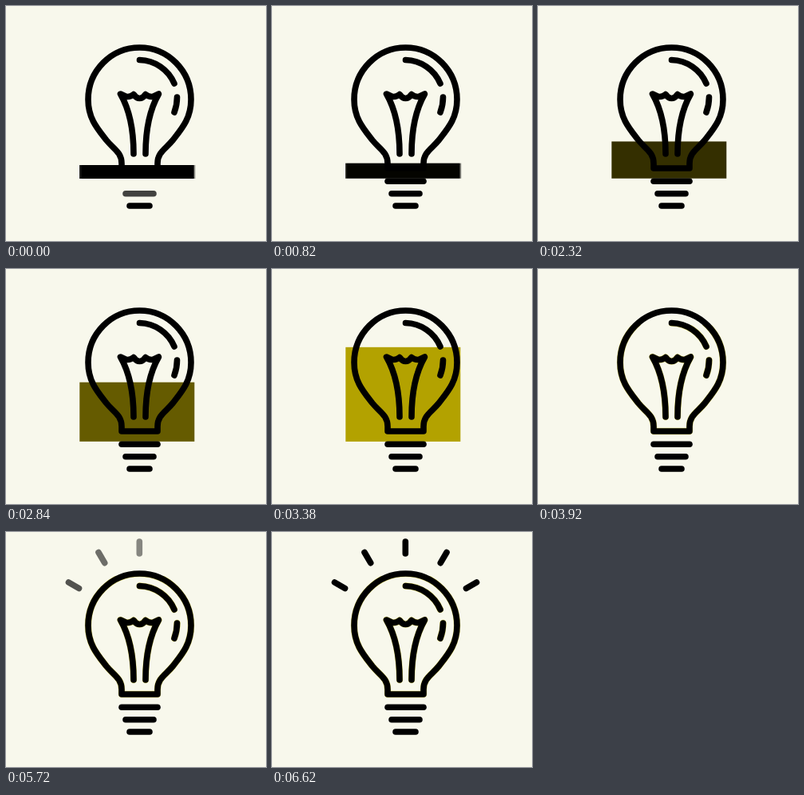
Write an HTML page without scripts that moves like this. It is 326 px wide and 294 px high and loops after 7.1 s.

```html
<!DOCTYPE html>
<html lang="en">
<head>
<meta charset="utf-8">
<title>Light bulb</title>
<style>
  html, body { margin: 0; width: 100%; height: 100%; overflow: hidden; background: #f8f8ec; }
  svg { display: block; width: 100vw; height: 100vh; }

  .ink { fill: none; stroke: #000; stroke-width: 7.6; stroke-linecap: round; stroke-linejoin: round; }
  .glow { fill: none; stroke: #d8cc20; stroke-width: 8.4; stroke-linecap: round; stroke-linejoin: round; opacity: .6; }

  .anim { animation: 7100ms linear infinite; }
  .level { transform-origin: 0 216px; animation-name: rise; }
  .tint { animation-name: tint; }
  .flood { animation-name: flood; }
  .after { animation-name: after; }
  .mid { animation-name: mid; }
  .top { animation-name: top; }
  .rays { animation-name: rays; }
  .ray { animation-name: ray; animation-delay: calc(var(--i) * 125ms); }

  /* liquid level and its colour share one easing */
  @keyframes rise {
    0% { transform: scaleY(.1056); animation-timing-function: cubic-bezier(.78, 0, .44, 1); }
    73.24%, 100% { transform: scaleY(1); }
  }
  @keyframes tint {
    0% { fill: #000; animation-timing-function: cubic-bezier(.78, 0, .44, 1); }
    73.24%, 100% { fill: #ffe600; }
  }
  @keyframes flood {
    0%, 50.98% { opacity: 1; }
    50.99%, 100% { opacity: 0; }
  }
  @keyframes after {
    0%, 50.98% { opacity: 0; }
    50.99%, 100% { opacity: 1; }
  }
  @keyframes mid {
    0% { opacity: .73; }
    2.8%, 100% { opacity: 1; }
  }
  @keyframes top {
    0%, 1.12% { opacity: 0; }
    1.13% { opacity: .36; }
    7.6%, 100% { opacity: 1; }
  }
  @keyframes rays {
    0%, 74% { opacity: 0; }
    74.01%, 100% { opacity: 1; }
  }
  @keyframes ray {
    0%, 75.35% { opacity: 0; }
    75.36% { opacity: .36; }
    86.2%, 100% { opacity: 1; }
  }
</style>
</head>
<body>
<svg viewBox="0 0 326 294">
  <defs>
    <g id="bulb">
      <path d="M145 203H190V197C190 183 200 179 209 168C220 154 232 141 232 117A64.5 65 0 1 0 103 117C103 141 115 154 126 168C135 179 145 183 145 197Z"/>
      <path d="M160 185C160 163 158 135 143.5 110L151 113.5Q156 114 160 110.5Q163.500 115.500 167.500 115.500Q171.500 115.500 175 110.500Q179 114 184 113.500L191.500 110C177 135 175 163 175 185"/>
      <path d="M167.500 67.500A48.500 48.500 0 0 1 211 97M214.500 114Q214.500 124 211 133"/>
    </g>
    <clipPath id="below">
      <rect class="anim level" x="92" y="55" width="145" height="161"/>
    </clipPath>
  </defs>

  <g class="anim flood">
    <g class="anim tint">
      <rect class="anim level" x="92.3" y="55" width="144" height="161"/>
    </g>
  </g>
  <g class="anim after">
    <g clip-path="url(#below)"><use href="#bulb" class="glow"/></g>
  </g>

  <g class="ink">
    <use href="#bulb"/>
    <path class="anim top" d="M145 219.300H190"/>
    <path class="anim mid" d="M150 234.800H185"/>
    <path d="M155 250H180"/>
    <g class="anim rays">
      <path class="anim ray" style="--i:0" d="M78.500 63L91.500 70.500"/>
      <path class="anim ray" style="--i:1" d="M116 25.500L123.700 38.700"/>
      <path class="anim ray" style="--i:2" d="M167.300 12V27"/>
      <path class="anim ray" style="--i:3" d="M219 25.500L211.300 38.700"/>
      <path class="anim ray" style="--i:4" d="M256.500 63L243.500 70.500"/>
    </g>
  </g>
</svg>
</body>
</html>
```
